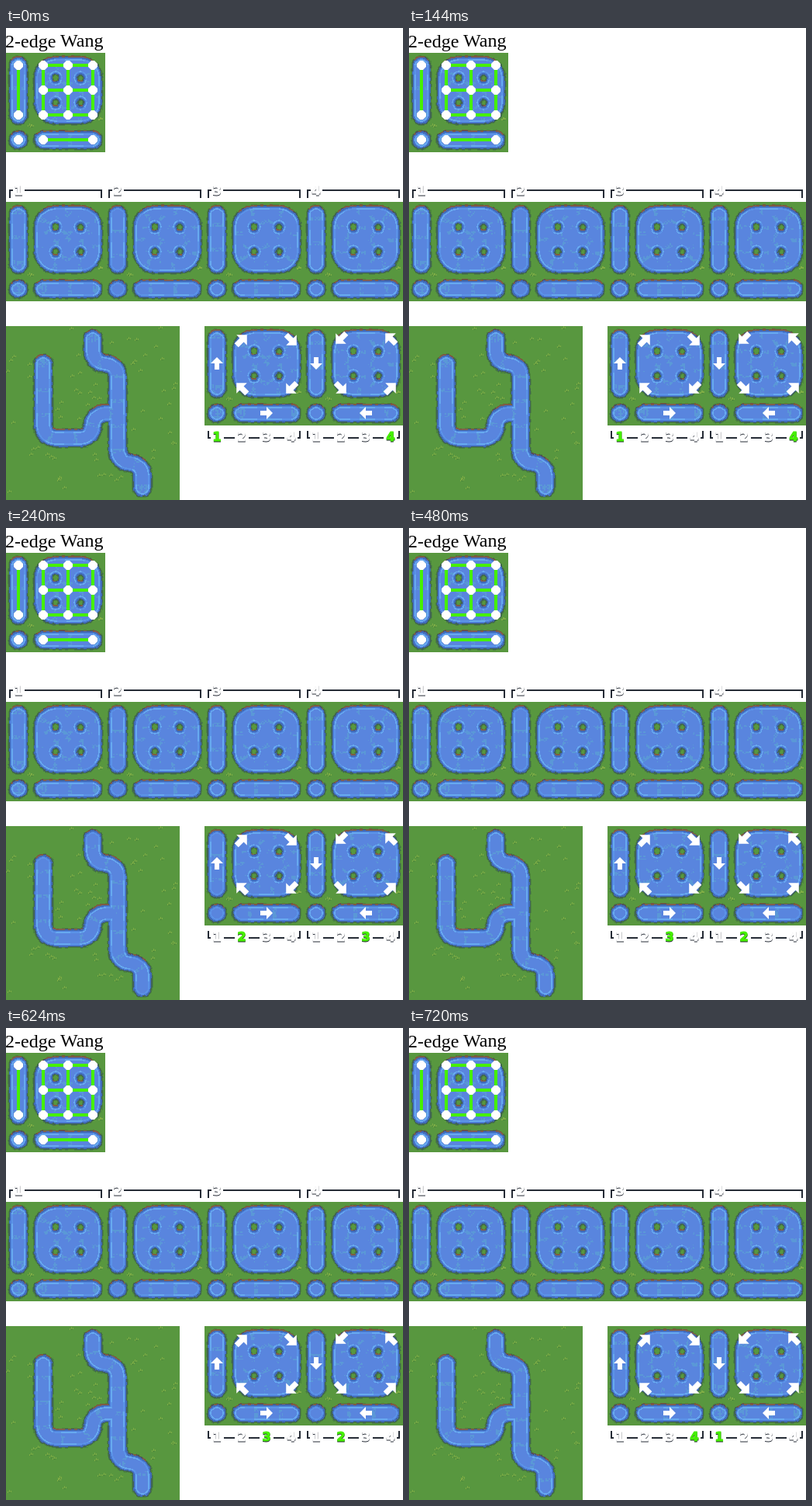
Animation, 512 px wide and 608 px high, one loop 0.96 s. Source, as an HTML page with a canvas:

```html
<!DOCTYPE html>
<html lang="en">
<head>
<meta charset="utf-8">
<title>Flowing water tiles</title>
<style>
html, body { margin: 0; width: 100%; height: 100%; overflow: hidden; background: #fff; }
canvas { display: block; }
</style>
</head>
<body>
<canvas id="stage" width="512" height="608"></canvas>
<script>
const ctx = document.getElementById('stage').getContext('2d');
const RADIUS = 10.4, BEND = 16, PERIOD = 32, STEP = 240, PHASES = [0, 1, 2, 3];
const INK = '#252b35', GREEN = '#46f000';

// Seeded noise in 0..1 for a pixel cell
function hash(x, y) {
  let n = Math.imul(x + 17, 374761393) + Math.imul(y + 31, 668265263);
  n = Math.imul(n ^ (n >>> 13), 1274126177);
  return ((n ^ (n >>> 16)) >>> 0) / 4294967296;
}

// Turns a right-angled route into short segments with rounded corners
function route(...pts) {
  const line = [pts[0]];
  for (let i = 1; i < pts.length - 1; i++) {
    const [px, py] = pts[i - 1], [x, y] = pts[i], [qx, qy] = pts[i + 1];
    const ax = BEND * Math.sign(px - x), ay = BEND * Math.sign(py - y);
    const bx = BEND * Math.sign(qx - x), by = BEND * Math.sign(qy - y);
    for (let k = 0; k <= 4; k++) {
      const s = 1 - Math.sin(k * Math.PI / 8), c = 1 - Math.cos(k * Math.PI / 8);
      line.push([x + ax * s + bx * c, y + ay * s + by * c]);
    }
  }
  line.push(pts[pts.length - 1]);
  let at = 0;
  return line.slice(1).map(([x, y], i) => {
    const [x0, y0] = line[i], len = Math.hypot(x - x0, y - y0);
    const seg = { x: x0, y: y0, dx: x - x0, dy: y - y0, len, at };
    at += len;
    return seg;
  });
}

// Closed clockwise route with a given half size
function ring(x, y, r) {
  return route([x, y - r], [x + r, y - r], [x + r, y + r], [x - r, y + r], [x - r, y - r], [x, y - r]);
}

// Distance from the shore, place along the flow and upward facing of a point
function probe(segs, x, y) {
  let best = { d: 1e9 };
  for (const s of segs) {
    const k = s.len ? Math.max(0, Math.min(1, ((x - s.x) * s.dx + (y - s.y) * s.dy) / s.len ** 2)) : 0;
    const oy = y - s.y - k * s.dy, d = Math.hypot(x - s.x - k * s.dx, oy);
    if (d < best.d) best = { d, u: s.at + k * s.len, up: -oy / (d || 1) };
  }
  best.d -= RADIUS;
  return best;
}

function colour(p, x, y, phase) {
  const bump = hash(x >> 2, y >> 2), coarse = hash(x >> 1, y >> 1);
  const top = p.up > 0.6;
  const d = p.d + (top ? 1 : 0) + (p.d > 0 ? (bump - 0.5) * 1.6 : 0);
  if (d > 3.2) return '#58973f';
  if (d > 2.3) return top && bump > 0.4 ? '#79573f' : '#4c863c';
  if (d > 0.9) return top ? (bump > 0.3 ? '#82604e' : '#50515a') : '#416455';
  if (d > -0.6) return '#416bb7';
  const flow = (((p.u - phase * 8) % PERIOD) + PERIOD) % PERIOD;
  if (d > -1.7) return '#5082dc';
  if (d > -3.3) return flow < 20 ? '#67aaf0' : '#5b93e8';
  return flow < 5 && coarse > 0.5 ? '#5a98d7' : '#5985de';
}

function tuft(c, x, y) {
  c.fillStyle = '#80ad45';
  c.fillRect(x, y, 1, 2);
  c.fillRect(x + 2, y - 2, 1, 3);
  c.fillRect(x + 4, y - 1, 1, 2);
  c.fillStyle = '#4c883a';
  c.fillRect(x + 1, y + 1, 3, 1);
}

function makeFrames(size, segs, tufts) {
  const field = [];
  for (let y = 0; y < size; y++)
    for (let x = 0; x < size; x++) field.push(probe(segs, x + 0.5, y + 0.5));
  return PHASES.map(phase => {
    const can = document.createElement('canvas');
    can.width = can.height = size;
    const c = can.getContext('2d');
    field.forEach((p, i) => {
      const x = i % size, y = Math.floor(i / size);
      c.fillStyle = colour(p, x, y, phase);
      c.fillRect(x, y, 1, 1);
    });
    for (let i = 0; i < tufts; i++) {
      const x = Math.floor(hash(i, 200) * (size - 6)), y = 2 + Math.floor(hash(i * 7, 300) * (size - 6));
      if (field[y * size + x + 2].d > 7) tuft(c, x, y);
    }
    return can;
  });
}

const tiles = makeFrames(128, [
  ...route([16, 80], [16, 16]),
  ...route([16, 112], [16, 112]),
  ...route([48, 112], [112, 112]),
  ...ring(80, 48, 32),
  ...[64, 96].flatMap(x => [32, 64].flatMap(y => ring(x, y, 16))),
  ...route([80, 48], [80, 48])
], 60);

const river = makeFrames(224, [
  ...route([112, 16], [112, 48], [144, 48], [144, 176], [176, 176], [176, 208]),
  ...route([48, 48], [48, 144], [112, 144], [112, 112], [144, 112])
], 90);

function stroke(color, width, ...lines) {
  ctx.strokeStyle = color;
  ctx.lineWidth = width;
  ctx.beginPath();
  for (const [first, ...rest] of lines) {
    ctx.moveTo(...first);
    rest.forEach(p => ctx.lineTo(...p));
  }
  ctx.stroke();
}

function fillShape(points) {
  ctx.fillStyle = '#fff';
  ctx.beginPath();
  points.forEach(p => ctx.lineTo(...p));
  ctx.fill();
}

// Bold digit above its own dark copy, so only lower edges show ink
function digit(n, x, y, color) {
  ctx.font = 'bold 16px "DejaVu Sans", sans-serif';
  ctx.textAlign = 'center';
  ctx.lineWidth = 1;
  [[INK, 1], [color, 0]].forEach(([ink, drop]) => {
    ctx.fillStyle = ctx.strokeStyle = ink;
    ctx.strokeText(n, x, y + drop);
    ctx.fillText(n, x, y + drop);
  });
}

function arrow(x, y, degrees, size) {
  ctx.save();
  ctx.translate(x, y);
  ctx.rotate(degrees * Math.PI / 180);
  ctx.scale(size, size);
  fillShape([[-8, -3], [0, -3], [0, -8], [8, 0], [0, 8], [0, 3], [-8, 3]]);
  ctx.restore();
}

function drawWang() {
  ctx.fillStyle = '#000';
  ctx.font = '24px "Liberation Serif", serif';
  ctx.textAlign = 'left';
  ctx.fillText('2-edge', -1, 25);
  ctx.fillText('Wang', 70, 24);
  ctx.drawImage(tiles[0], 0, 32);
  const marks = [48, 80, 112];
  stroke(GREEN, 4, [[16, 48], [16, 112]], [[48, 144], [112, 144]],
    ...marks.map(m => [[m, 48], [m, 112]]), ...marks.map(m => [[48, m], [112, m]]));
  const nodes = [[16, 48], [16, 112], [16, 144], [48, 144], [112, 144]];
  for (const x of marks) for (const y of marks) nodes.push([x, y]);
  for (const [x, y] of nodes)
    fillShape([[x - 2, y - 6], [x + 2, y - 6], [x + 6, y - 2], [x + 6, y + 2],
      [x + 2, y + 6], [x - 2, y + 6], [x - 6, y + 2], [x - 6, y - 2]]);
}

function drawSheet(i) {
  const x = i * 128;
  ctx.drawImage(tiles[i], x, 224);
  stroke(INK, 2, [[x + 5, 219], [x + 5, 209], [x + 9, 209]],
    [[x + 24, 209], [x + 123, 209], [x + 123, 219]]);
  digit(i + 1, x + 16, 215, '#fff');
}

function drawFlow(x, phase, reverse) {
  const turn = reverse ? 180 : 0;
  ctx.drawImage(tiles[phase], x, 384);
  arrow(x + 16, 432, turn - 90, 1);
  arrow(x + 80, 496, turn, 1);
  [[48, 402], [112, 402], [112, 464], [48, 464]].forEach(([ax, ay], i) =>
    arrow(x + ax, ay - (reverse && i < 2 ? 2 : 0), turn - 45 + 90 * i, 1.2));
  stroke(INK, 2, [[x + 5, 519], [x + 5, 528], [x + 8, 528]],
    ...[25, 57, 89].map(g => [[x + g, 528], [x + g + 14, 528]]),
    [[x + 120, 528], [x + 123, 528], [x + 123, 519]]);
  PHASES.forEach(i => digit(i + 1, x + 16 + i * 32, 532, i === phase ? GREEN : '#fff'));
}

function draw(phase) {
  ctx.fillStyle = '#fff';
  ctx.fillRect(0, 0, 512, 608);
  drawWang();
  PHASES.forEach(drawSheet);
  ctx.drawImage(river[phase], 0, 384);
  drawFlow(256, phase, false);
  drawFlow(384, 3 - phase, true);
}

let shown = -1;
function tick(now) {
  const phase = Math.floor(now / STEP) % 4;
  if (phase !== shown) draw(shown = phase);
  requestAnimationFrame(tick);
}
draw(0);
requestAnimationFrame(tick);
</script>
</body>
</html>
```
